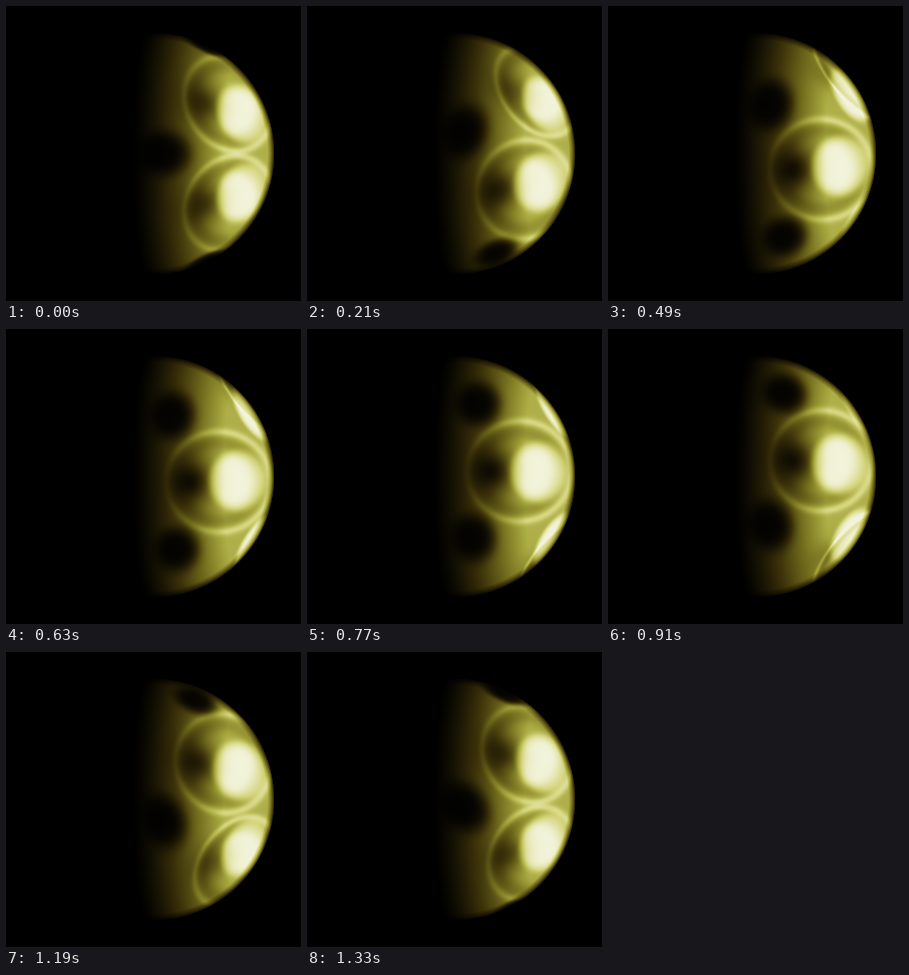
Recreate the animation shown at these times as an HTML page with a canvas. Size 295 px wide and 295 px high, loop 1400 ms.

```html
<!DOCTYPE html>
<html>
<head>
<meta charset="utf-8">
<style>
html, body { margin: 0; width: 100%; height: 100%; overflow: hidden; background: #000; }
canvas { display: block; }
</style>
</head>
<body>
<canvas id="c" width="295" height="295"></canvas>
<script>
const SIZE = 295, RADIUS = 121, CENTER = 147.5, STEPS = 20, STEP_MS = 70;
const DEG = Math.PI / 180, SECTOR = 72;
const ctx = document.getElementById('c').getContext('2d');
const clamp = v => Math.min(1, Math.max(0, v));

// Five-fold families of marks. Each mark circles the tilted axis, which projects
// to an ellipse around (x, 0) with half axes (swing, reach), relative to the centre.
const families = {
  lobe:   { x: 106, swing: 22, reach: 67, across: 39, along: 30, offset: 0 },
  hollow: { x: 106, swing: 70, reach: 86, across: 21, along: 21, offset: 0 },
  ring:   { x: 117, swing: 52, reach: 85, across: 62, along: 50, offset: 0 },
  pit:    { x: 73,  swing: 65, reach: 114, across: 29, along: 23, offset: .5 }
};

// Marks of one family on the near side, squeezed towards the limb
function place(family, turn) {
  const marks = [];
  for (let k = -2; k <= 2; k++) {
    const angle = ((k + family.offset + .5 - turn) * SECTOR) * DEG;
    const near = Math.cos(angle);
    if (near <= 0) continue;
    const x = family.x - family.swing * near, y = family.reach * Math.sin(angle);
    const dist = Math.hypot(x, y), r = dist / RADIUS;
    const squeeze = Math.max(.25, Math.sqrt(Math.max(0, 1 - r * r)));
    marks.push({
      x, y, near, fade: clamp(near * 4), ux: x / dist, uy: y / dist,
      across: family.across * squeeze, along: family.along
    });
  }
  return marks;
}

// Squared distance from a mark, 1 on its outline
function reachOf(mark, x, y) {
  const dx = x - mark.x, dy = y - mark.y;
  const a = (dx * mark.ux + dy * mark.uy) / mark.across;
  const b = (dy * mark.ux - dx * mark.uy) / mark.along;
  return a * a + b * b;
}

const pixels = [];
for (let py = 0; py < SIZE; py++) {
  for (let px = 0; px < SIZE; px++) {
    const x = px + .5 - CENTER, y = py + .5 - CENTER;
    const r = Math.hypot(x, y) / RADIUS;
    if (r >= 1) continue;
    const light = x / RADIUS + .12 * Math.sqrt(1 - r * r);
    if (light < -.2) continue;
    pixels.push({
      x, y, at: (py * SIZE + px) * 4,
      base: .64 * clamp((light + .06) / .74) ** 1.4,
      rim: clamp((1 - r) * RADIUS / 7) ** .6
    });
  }
}

function brightness({ x, y, base, rim }, marks) {
  let v = base;
  for (const m of marks.ring) {
    const q = Math.sqrt(reachOf(m, x, y));
    v += base * m.fade * (.3 * Math.exp(-(((q - 1) / .08) ** 2)) - .16 * Math.exp(-(((q - .78) / .16) ** 2)));
  }
  for (const m of marks.hollow) v *= 1 - .85 * m.near ** 2 * Math.exp(-reachOf(m, x, y));
  for (const m of marks.pit) v *= 1 - .93 * m.fade * Math.exp(-(reachOf(m, x, y) ** 2));
  for (const m of marks.lobe) v += .36 * m.fade * Math.exp(-(reachOf(m, x, y) ** 4));
  return clamp(v) * rim;
}

const ramp = [[0, 0, 0], [56, 46, 8], [112, 106, 28], [166, 166, 62], [212, 212, 124], [243, 243, 220]];
function shade(v, channel) {
  const s = v * (ramp.length - 1), i = Math.min(ramp.length - 2, Math.floor(s));
  return ramp[i][channel] + (ramp[i + 1][channel] - ramp[i][channel]) * (s - i);
}

const frames = [];
function render(step) {
  const image = ctx.createImageData(SIZE, SIZE);
  const marks = {};
  for (const name in families) marks[name] = place(families[name], step / STEPS);
  for (const p of pixels) {
    const v = brightness(p, marks);
    for (let k = 0; k < 3; k++) image.data[p.at + k] = shade(v, k);
    image.data[p.at + 3] = 255;
  }
  return image;
}

let shown = -1;
function draw(now) {
  const step = Math.floor(now / STEP_MS) % STEPS;
  if (step !== shown) {
    ctx.putImageData(frames[step] ||= render(step), 0, 0);
    shown = step;
  }
  requestAnimationFrame(draw);
}
draw(performance.now());
</script>
</body>
</html>
```
